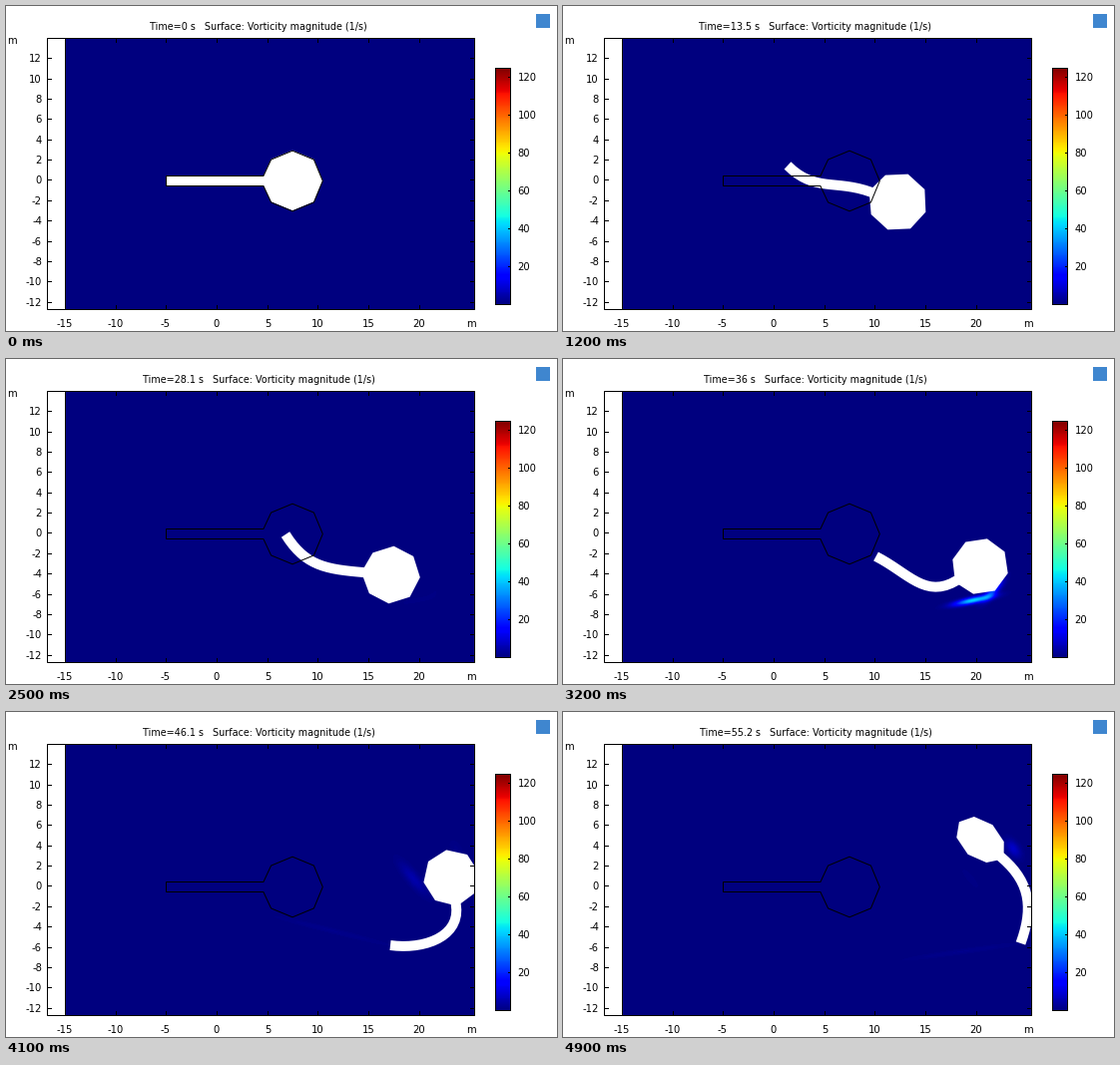
Animation, 552 px wide and 326 px high, one loop 5000 ms. Source, as a matplotlib script:

```python
import numpy as np
import matplotlib.pyplot as plt
from matplotlib.animation import FuncAnimation
from matplotlib.patches import Polygon, Rectangle

W, H, DPI = 552, 326, 100
FRAMES, INTERVAL = 50, 100
LEFT, RIGHT, TOP, BOTTOM = 41, 470, 32, 305
DOMAIN = 59
PX = 72 / DPI  # points per pixel
plt.rcParams["font.family"] = "DejaVu Sans"

# Key poses: head x, y, heading; tail tip x, y, direction (degrees, y down)
KEYS = np.array([0, 12, 18, 25, 32, 41, 49])
POSES = np.array([
    (287, 175, 0, 160.5, 175, 0),
    (335.5, 196.5, 20, 225, 160, 45),
    (354.5, 208, 4, 247, 161.5, 15),
    (386, 216.5, 5, 280, 176, 58),
    (418, 208, -31, 313.5, 198, 27),
    (446, 166, -100, 385, 234, 8),
    (418, 128, -140, 458.5, 232, -70),
])
SLOPES = np.gradient(POSES, KEYS, axis=0)

# Vorticity patches: frame, duration, x, y, angle, length, width, peak
WAKES = [
    (32, 2.5, 411, 242, -12, 13, 2.2, 42),
    (32, 2.5, 431, 232, -48, 9, 3, 24),
    (41, 4, 408, 167, 50, 14, 4, 5),
    (49, 4, 451, 137, 55, 7, 4, 8),
]


def hermite(u, start, end, start_slope, end_slope):
    return ((1 + 2 * u) * (1 - u) ** 2 * start + u * (1 - u) ** 2 * start_slope
            + u * u * (3 - 2 * u) * end + u * u * (u - 1) * end_slope)


def pose(n):
    i = min(np.searchsorted(KEYS, n, side="right") - 1, len(KEYS) - 2)
    span = KEYS[i + 1] - KEYS[i]
    return hermite((n - KEYS[i]) / span, POSES[i], POSES[i + 1],
                   span * SLOPES[i], span * SLOPES[i + 1])


def unit(degrees):
    return np.array([np.cos(np.radians(degrees)), np.sin(np.radians(degrees))])


def body(n):
    """Octagonal head that shrinks slowly and flattens at the end, with a bent tail."""
    x, y, heading, tip_x, tip_y, tip_angle = pose(n)
    center, tip = np.array([x, y]), np.array([tip_x, tip_y])
    ahead, aside = unit(heading), unit(heading + 90)
    length = 30.3 - 0.055 * n
    width = length * (1 - 0.3 * np.clip((n - 41) / 8, 0, 1))
    turn = np.radians(np.arange(-135, 136, 45))[:, None]
    head = center + length * np.cos(turn) * ahead + width * np.sin(turn) * aside

    joint = center - 0.96 * length * ahead
    pull = 1.3 * np.linalg.norm(joint - tip)
    mid = hermite(np.linspace(0, 1, 17)[:, None], tip, joint,
                  pull * unit(tip_angle), pull * ahead)
    tangent = np.gradient(mid, axis=0)
    tangent /= np.linalg.norm(tangent, axis=1, keepdims=True)
    normal = 5 * np.column_stack([tangent[:, 1], -tangent[:, 0]])
    return np.vstack([mid + normal, head, (mid - normal)[::-1]])


GX, GY = np.meshgrid(np.arange(DOMAIN, RIGHT) + 0.5, np.arange(TOP, BOTTOM) + 0.5)


def patch(x, y, angle, length, width, peak):
    c, s = unit(angle)
    along = ((GX - x) * c + (GY - y) * s) / length
    across = ((GY - y) * c - (GX - x) * s) / width
    return peak * np.exp(-(along ** 2 + across ** 2) / 2)


def vorticity(n):
    field = sum(np.exp(-((n - when) / duration) ** 2 / 2) * patch(*shape)
                for when, duration, *shape in WAKES)
    # Faint streak left behind the tail tip
    angle = 14 - 2.75 * (n - 41)
    x, y = pose(n)[3:5] - 60 * unit(angle)
    return field + patch(x, y, angle, 40, 2, 1.5 * np.clip((n - 36) / 5, 0, 1))


fig = plt.figure(figsize=(W / DPI, H / DPI), dpi=DPI, facecolor="white")
ax = fig.add_axes([0, 0, 1, 1])
ax.axis("off")


def line(xs, ys):
    ax.plot(xs, ys, color="black", lw=PX, zorder=5, solid_capstyle="butt", snap=False)


def frame(x0, y0, x1, y1):
    """One-pixel border just inside the given pixel edges."""
    ax.add_patch(Rectangle((x0 + 0.5, y0 + 0.5), x1 - x0 - 1, y1 - y0 - 1, fill=False,
                           lw=PX, ec="black", zorder=5, snap=False))


def label(x, y, text, ha="center", size=10):
    return ax.text(x, y, text, ha=ha, va="center_baseline", fontsize=size * PX, color="black")


surface = ax.imshow(vorticity(0), cmap="jet", vmin=0, vmax=125, aspect="auto",
                    extent=(DOMAIN, RIGHT, BOTTOM, TOP), interpolation="nearest")
ax.imshow(np.linspace(1, 0, 238)[:, None], cmap="jet", aspect="auto",
          extent=(490, 506, 300, 62), interpolation="nearest")
ax.set(xlim=(0, W), ylim=(H, 0))

swimmer = ax.add_patch(Polygon(body(0), fc="white", ec="none", zorder=3))
swimmer.set_clip_path(Rectangle((LEFT, TOP), RIGHT - LEFT, BOTTOM - TOP,
                                transform=ax.transData))
ax.add_patch(Polygon(body(0) + [0, 0.5], fill=False, ec="black", lw=PX, zorder=4, snap=False))

frame(LEFT, TOP, RIGHT, BOTTOM)
frame(490, 62, 506, 300)
line([DOMAIN + 0.5] * 2, [TOP, BOTTOM])

for value in range(-12, 13, 2):
    y = round(174.5 - 10.18 * value) + 0.5
    line([LEFT, LEFT + 5], [y, y])
    line([RIGHT - 5, RIGHT], [y, y])
    label(36, y - 0.8, str(value), "right")
for value in range(-15, 21, 5):
    x = round(211 + 10.14 * value) + 0.5
    line([x, x], [BOTTOM - 5, BOTTOM])
    line([x, x], [TOP, TOP + 5])
    label(x - 0.5, 317.5, str(value))
for value in range(20, 121, 20):
    y = round(299.5 - 1.905 * value) + 0.5
    line([503, 506], [y, y])
    label(512.5, y - 0.8, str(value), "left")
label(466, 317.5, "m")
label(6, 34.5, "m")
title = label(253, 20.5, "", size=9.65)

ax.add_patch(Rectangle((531, 8), 14, 14, fc="#3f86cf", ec="none"))


def update(n):
    seconds = 552 * n // 49 / 10
    title.set_text(f"Time={seconds:g} s   Surface: Vorticity magnitude (1/s)")
    surface.set_data(vorticity(n))
    swimmer.set_xy(body(n))
    return title, surface, swimmer


anim = FuncAnimation(fig, update, frames=FRAMES, interval=INTERVAL,
                     repeat=True, repeat_delay=0)
plt.show()
```
